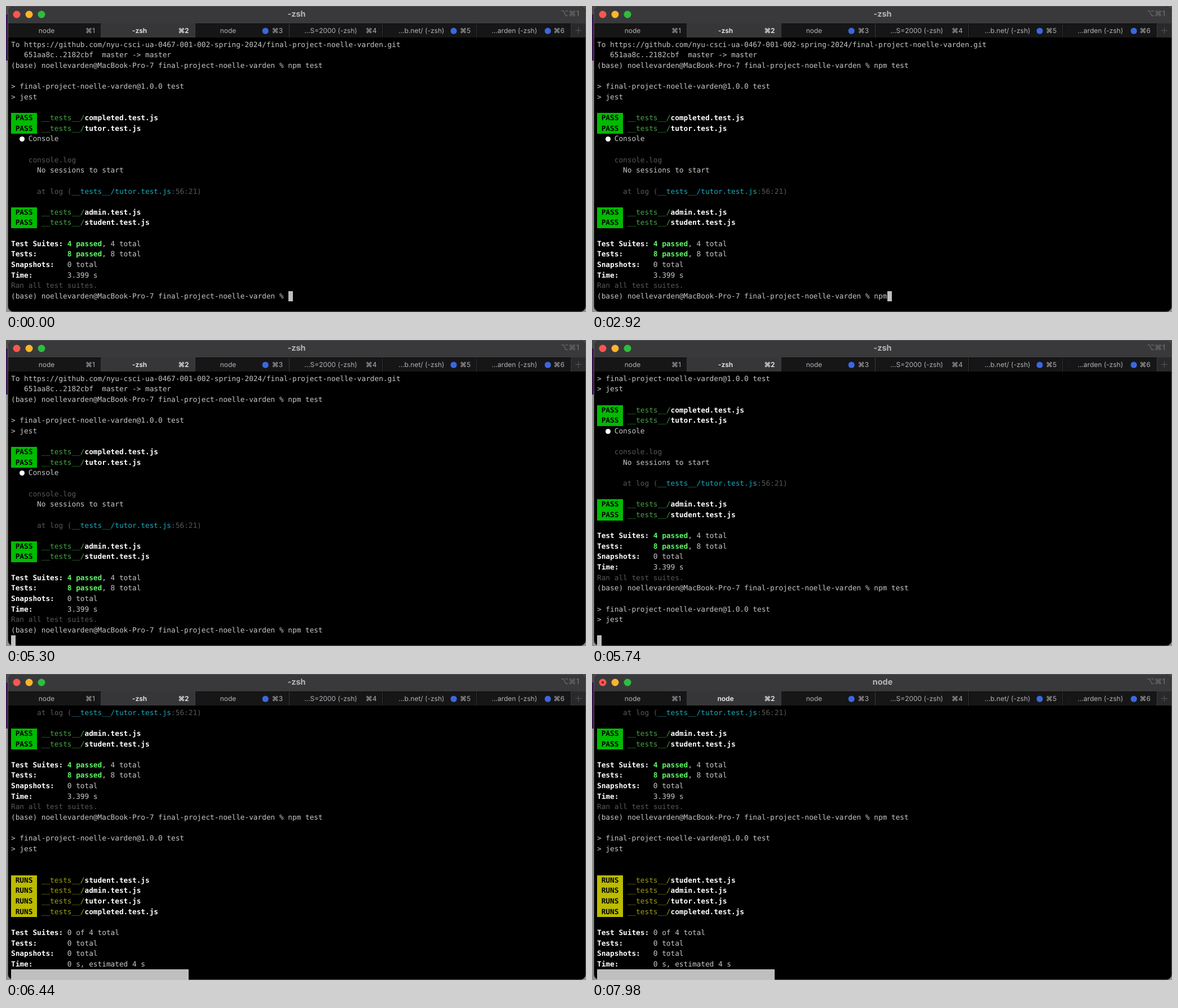
These frames come from a looping animation (1029x544 px, 8000 ms). An HTML page:

```html
<!DOCTYPE html>
<html lang="en">
<head>
<meta charset="utf-8">
<title>Terminal</title>
<style>
  html, body { margin: 0; width: 100%; height: 100%; overflow: hidden; background: #000; }
  #stage {
    position: relative; width: 1029px; height: 544px; overflow: hidden;
    background: linear-gradient(#4a4a4c 15px, #3a1650 15px 97px, #92928f 97px);
    text-rendering: geometricPrecision;
  }
  #stage div { position: absolute; box-sizing: border-box; }
  #win { left: 3px; top: 0; width: 1026px; height: 544px; background: #000; border: 1px solid #58585a; border-radius: 10px; overflow: hidden; }
  #bar { left: 0; top: 0; width: 1029px; height: 544px; font: 12px/25px Inter, "DejaVu Sans", sans-serif; color: #b2b2b4; white-space: pre; }
  #head { left: 4px; top: 1px; width: 1024px; height: 30px; background: #39393b; border-radius: 9px 9px 0 0; }
  .mid { transform: translateX(-50%); }
  #title { left: 515.5px; top: 2px; font-size: 14.5px; font-weight: 700; color: #b6b6b8; }
  #hint { right: 12px; top: 2px; font-size: 13.5px; font-weight: 500; color: #6b6b6d; }
  .tab { top: 31px; height: 25px; background: #161617; border-right: 1px solid #3b3b3d; border-top: 1px solid #0c0c0d; }
  .tab.on { background: #363638; border-top-color: #363638; }
  .lab { top: 31px; }
  .on { color: #efeff0; font-weight: 600; }
  .disc { border-radius: 50%; transform: translate(-50%, -50%); }
  #plus { left: 1003px; top: 31px; width: 25px; height: 25px; background: #29292b; }
  #plus::before, #plus::after { content: ""; position: absolute; background: #565658; }
  #plus::before { left: 7px; top: 12px; width: 11px; height: 1px; }
  #plus::after { left: 12px; top: 7px; width: 1px; height: 11px; }
  #view { left: 4px; top: 59px; width: 1024px; height: 485px; overflow: hidden; }
  #text { left: 5px; top: 0.7px; font: 12.769px "DejaVu Sans Mono", monospace; color: #c7c7c7; white-space: pre; }
  #text div { left: 0; height: 18.63px; }
  #text .row { line-height: 18.63px; margin-top: 1px; }
  #text b { color: #fff; }
  /* Badges fill the whole cell, one pixel above the text box */
  .pass, .runs {
    display: inline-block; box-sizing: border-box; height: 18.63px; margin-top: -1px; padding-top: 1px;
    vertical-align: top; color: #000; font-weight: 700;
  }
  .pass { background: #00bb00; }
  .runs { background: #bbbb00; }
  .green { color: #46a447; }
  .olive { color: #9f9f14; }
  #text .ok { color: #5ff967; }
  .dim { color: #585858; }
  .cyan { color: #1ba9b9; }
  .dot { display: inline-block; position: relative; color: transparent; line-height: 15px; }
  .dot::before { content: ""; position: absolute; left: -0.5px; top: 2.7px; width: 9px; height: 9px; border-radius: 50%; background: #fff; }
  #cursor { background: #bfbfbf; }
</style>
</head>
<body>
<div id="stage">
  <div id="win"></div>
  <div id="bar">
    <div id="head"></div>
    <div id="title" class="mid"></div>
    <div id="hint">⌥⌘1</div>
    <div id="plus"></div>
  </div>
  <div id="view"><div id="text"></div></div>
</div>
<script>
const LOOP = 8000, ROW = 18.63, COL = 7.6875;
const COMMAND = "npm test";
const KEYS = [160, 1560, 2080, 3050, 3460, 3800, 4400, 4700];
const ENTER = 5240, STARTED = 5560, RUNNING = 6240, RETITLED = 6860;

const $ = id => document.getElementById(id);
const span = (cls, text) => `<span class="${cls}">${text}</span>`;
const bold = (text, cls = "") => `<b class="${cls}">${text}</b>`;
const pass = file => span("pass", " PASS ") + " " + span("green", "__tests__/") + bold(file + ".test.js");
const runs = file => span("runs", " RUNS ") + " " + span("olive", "__tests__/") + bold(file + ".test.js");
const stat = (name, value) => bold(name.padEnd(13)) + value;

function add(parent, cls, style, html = "") {
  const el = document.createElement("div");
  el.className = cls;
  Object.assign(el.style, style);
  el.innerHTML = html;
  parent.append(el);
  return el;
}

function disc(x, y, size, color) {
  return add($("bar"), "disc", { left: x + "px", top: y + "px", width: size + "px", height: size + "px", background: color });
}

// Window buttons
disc(18.5, 15.3, 13, "#fc5650");
disc(40.5, 15.3, 13, "#fdb42c");
disc(62.5, 15.3, 13, "#2ac03c");
const busy = disc(18.5, 15.3, 4, "#7d100c");

// Tabs: label, label centre, blue marker
const tabs = [
  ["node", 72], ["-zsh", 237], ["node", 394, 460],
  ["…S=2000 (-zsh)", 576], ["…b.net/ (-zsh)", 737, 794], ["…arden (-zsh)", 902, 961]
];
const labels = tabs.map(([text, x, mark], i) => {
  const left = i ? 2 + 167 * i : 4, right = 169 + 166.8 * i;
  const on = i === 1 ? " on" : "";
  add($("bar"), "tab" + on, { left: left + "px", width: right - left + "px" });
  add($("bar"), "lab" + on, { right: 1029 - 158 - 166.6 * i + "px" }, "⌘" + (i + 1));
  if (mark) disc(mark, 44, 10.5, "#3b68e0");
  return add($("bar"), "lab mid" + on, { left: x + "px" }, text);
});

const prompt = "(base) noellevarden@MacBook-Pro-7 final-project-noelle-varden % ";
const banner = ["", "> final-project-noelle-varden@1.0.0 test", "> jest", ""];
const before = [
  "To https://github.com/nyu-csci-ua-0467-001-002-spring-2024/final-project-noelle-varden.git",
  "   651aa8c..2182cbf  master -> master",
  prompt + COMMAND,
  ...banner,
  pass("completed"),
  pass("tutor"),
  "  " + span("dot", "●") + " Console",
  "",
  span("dim", "    console.log"),
  "      No sessions to start",
  "",
  span("dim", "      at log (") + span("cyan", "__tests__/tutor.test.js") + span("dim", ":56:21)"),
  "",
  pass("admin"),
  pass("student"),
  "",
  stat("Test Suites:", bold("4 passed", "ok") + ", 4 total"),
  stat("Tests:", bold("8 passed", "ok") + ", 8 total"),
  stat("Snapshots:", "0 total"),
  stat("Time:", "3.399 s"),
  span("dim", "Ran all test suites."),
  prompt + "<span id=typed></span>"
];
const progress = [
  "",
  ...["student", "admin", "tutor", "completed"].map(runs),
  "",
  stat("Test Suites:", "0 of 4 total"),
  stat("Tests:", "0 total"),
  stat("Snapshots:", "0 total"),
  stat("Time:", "0 s, estimated 4 s")
];
const promptRow = before.length - 1;
const bannerEnd = before.length + banner.length;
const rows = [...before, ...banner, ...progress].map(html => add($("text"), "row", {}, html));
const cursor = add($("text"), "", {});
cursor.id = "cursor";

function draw(t) {
  const typed = KEYS.filter(k => t >= k).length;
  let shown = before.length, scroll = 0, row = promptRow, col = prompt.length + typed, width = 1;
  if (t >= ENTER) { row++; col = 0; }
  if (t >= STARTED) { shown = row = bannerEnd; scroll = 4; }
  if (t >= RUNNING) { shown = row = rows.length; scroll = 14; width = 41; }

  $("typed").textContent = COMMAND.slice(0, typed);
  rows.forEach((el, i) => {
    el.style.display = i < shown && i >= scroll ? "" : "none";
    el.style.top = (i - scroll) * ROW + "px";
  });
  cursor.style.left = col * COL + "px";
  cursor.style.top = (row - scroll) * ROW + "px";
  cursor.style.width = width * COL + "px";

  const named = t >= RETITLED;
  $("title").textContent = labels[1].textContent = named ? "node" : "-zsh";
  busy.style.display = named ? "" : "none";
}

const start = performance.now();
function tick() {
  draw((performance.now() - start) % LOOP);
  requestAnimationFrame(tick);
}
tick();
</script>
</body>
</html>
```
